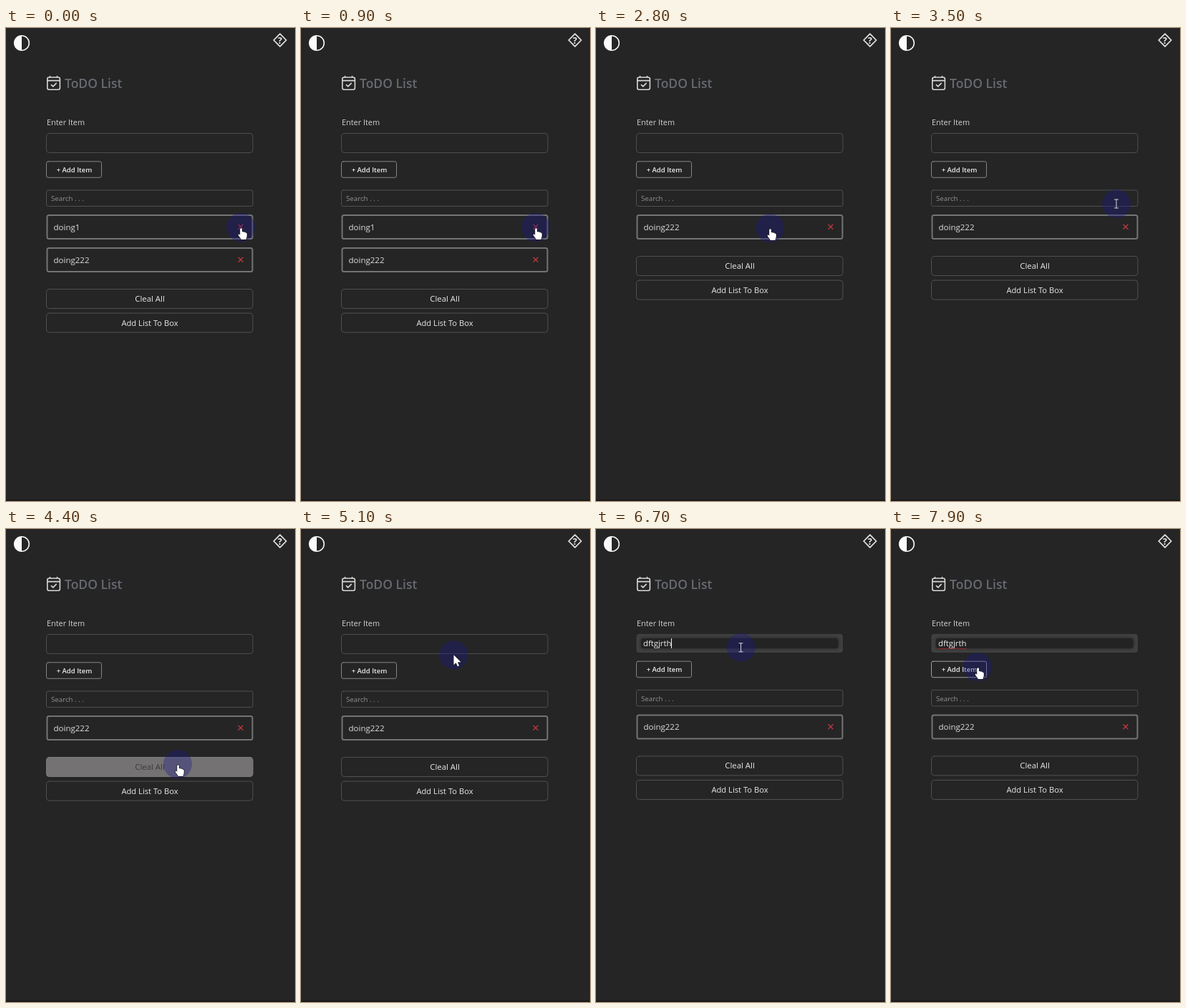
These frames come from a looping animation (404x662 px, 8000 ms). An HTML page with a canvas:

```html
<!DOCTYPE html>
<html lang="en">
<head>
<meta charset="utf-8">
<title>ToDO List</title>
<style>
html, body { margin: 0; width: 100%; height: 100%; overflow: hidden; background: #252526; }
canvas { display: block; width: 404px; height: 662px; }
</style>
</head>
<body>
<canvas id="stage"></canvas>
<script>
const W = 404, H = 662, LOOP = 8000, BG = '#252526';
const canvas = document.getElementById('stage');
const ctx = canvas.getContext('2d');
const dpr = window.devicePixelRatio || 1;
canvas.width = W * dpr;
canvas.height = H * dpr;

// Pointer hot spot: [ms, x, y]
const path = [
  [0, 328, 279], [2350, 328, 279], [2800, 243, 280], [3200, 258, 284],
  [3500, 315, 246], [3750, 337, 258], [4100, 262, 322], [4400, 240, 329],
  [4650, 236, 327], [5000, 214, 196], [5200, 213, 157], [6450, 213, 157],
  [6800, 200, 168], [7600, 200, 168], [7800, 113, 206], [7900, 121, 193], [8000, 121, 193]
];
const clicks = [1750, 5350];
const deleteAt = 2050, focusAt = 5400, popupAt = 5700, popupEnd = 6000, spellAt = 7300;
const typing = [[5700, 'd'], [5800, 'df'], [6000, 'dft'], [6100, 'dftgj'], [6200, 'dftgjr'], [6300, 'dftgjrth']];
const hints = ['dfgngfn', 'dtghmym', 'drfgn', 'dwfbdf', 'dfbqe', 'dfdfdf'];

const clamp = v => Math.max(0, Math.min(1, v));

function pointerAt(t) {
  let i = 0;
  while (i < path.length - 2 && path[i + 1][0] <= t) i++;
  const [t0, x0, y0] = path[i], [t1, x1, y1] = path[i + 1];
  const k = clamp((t - t0) / (t1 - t0)), e = k * k * (3 - 2 * k);
  return { x: x0 + (x1 - x0) * e, y: y0 + (y1 - y0) * e };
}

function text(s, x, y, size, color, weight = 400, align = 'left') {
  ctx.font = `${weight} ${size}px "Open Sans", "Noto Sans", sans-serif`;
  ctx.textAlign = align;
  ctx.textBaseline = 'alphabetic';
  ctx.fillStyle = color;
  ctx.fillText(s, x, y);
}

function box(x, y, w, h, r, stroke, width = 1, fill) {
  ctx.beginPath();
  ctx.roundRect(x, y, w, h, r);
  if (fill) { ctx.fillStyle = fill; ctx.fill(); }
  if (stroke) { ctx.strokeStyle = stroke; ctx.lineWidth = width; ctx.stroke(); }
}

function lines(points, color, width, close) {
  ctx.beginPath();
  points.forEach(([x, y], i) => i ? ctx.lineTo(x, y) : ctx.moveTo(x, y));
  if (close) ctx.closePath();
  ctx.strokeStyle = color;
  ctx.lineWidth = width;
  ctx.lineJoin = ctx.lineCap = 'round';
  ctx.stroke();
}

function themeIcon() {
  ctx.beginPath();
  ctx.arc(22, 21, 10.3, 0, 7);
  ctx.strokeStyle = '#f4f4f4';
  ctx.lineWidth = 1.6;
  ctx.stroke();
  ctx.beginPath();
  ctx.arc(22, 21, 10.5, Math.PI / 2, Math.PI * 1.5);
  ctx.fillStyle = '#fafafa';
  ctx.fill();
}

function helpIcon() {
  lines([[383, 8.2], [391.8, 17], [383, 25.8], [374.2, 17]], '#e6e6e6', 1.7, true);
  text('?', 383, 21.6, 12.5, '#f0f0f0', 700, 'center');
}

function calendarIcon() {
  const c = '#d8d9d5';
  box(57.8, 69, 17.6, 17.2, 2.5, c, 1.6);
  lines([[58, 73.6], [75, 73.6]], c, 1.6);
  lines([[61.5, 67.5], [61.5, 69]], c, 1.5);
  lines([[71.5, 67.5], [71.5, 69]], c, 1.5);
  lines([[63.4, 79.6], [65.8, 81.9], [70.2, 77.4]], c, 1.6);
}

function item(label, y) {
  box(57.5, y + 1, 287, 33, 2.5, '#747475', 2);
  text(label, 66.5, y + 21.5, 11.5, '#dededf');
  const cy = y + 17.3, r = 3;
  lines([[328 - r, cy - r], [328 + r, cy + r]], '#c4383d', 1.3);
  lines([[328 + r, cy - r], [328 - r, cy + r]], '#c4383d', 1.3);
}

function button(label, y, size, hover) {
  box(56.5, y + .5, 288.5, 27, 4, '#505051');
  if (hover > 0) {
    ctx.globalAlpha = hover;
    box(56.5, y + .5, 288.5, 27, 4, '#7d7b7b', 1, '#747272');
    ctx.globalAlpha = 1;
  }
  text(label, 201, y + 18, size, hover > .5 ? '#3c3b3b' : '#e8e8e8', 400, 'center');
}

function field(t, focused) {
  if (!focused) return box(56.5, 147.5, 288.5, 27, 4, '#4e4e4f');
  box(56.5, 147, 288.5, 26, 4, null, 0, '#414142');
  ctx.save();
  ctx.beginPath();
  ctx.roundRect(56.5, 147, 288.5, 26, 4);
  ctx.clip();
  ctx.shadowColor = '#222223';
  ctx.shadowBlur = 5 * dpr;
  box(63, 153, 275.5, 14, 3, null, 0, '#232324');
  ctx.restore();

  let value = '', last = focusAt;
  for (const [at, s] of typing) if (t >= at) { value = s; last = at; }
  text(value, 66, 164.3, 11.3, '#f0f0f0');
  const end = 66 + ctx.measureText(value).width;
  if (t >= spellAt) {
    ctx.beginPath();
    for (let x = 66; x <= end; x += .5) ctx.lineTo(x, 167.3 + .6 * Math.sin(x * 2.1));
    ctx.strokeStyle = '#b02a2a';
    ctx.lineWidth = 1;
    ctx.stroke();
  }
  if (Math.floor((t - last) / 530) % 2 === 0) {
    ctx.fillStyle = '#f4f4f4';
    ctx.fillRect(Math.round(end), 153, 1, 14);
  }
}

function popup() {
  ctx.save();
  ctx.shadowColor = 'rgba(0,0,0,.3)';
  ctx.shadowBlur = 4 * dpr;
  box(129.5, 180, 114.5, 164.5, 4, null, 0, '#1d1d1e');
  ctx.restore();
  hints.forEach((s, i) => text(s, 138, 199.5 + i * 26.4, 9.2, '#dedede', 600));
}

function hand(x, y) {
  ctx.save();
  ctx.translate(x, y);
  ctx.beginPath();
  ctx.moveTo(-.8, 9);
  ctx.lineTo(-.8, 2.2);
  ctx.quadraticCurveTo(.6, .2, 2, 2.2);
  ctx.lineTo(2, 6.2);
  ctx.quadraticCurveTo(3.6, 5.4, 4.6, 6.8);
  ctx.quadraticCurveTo(6, 6.2, 6.9, 7.5);
  ctx.quadraticCurveTo(8.6, 7.2, 8.8, 9);
  ctx.lineTo(8.8, 12);
  ctx.quadraticCurveTo(8.5, 14.5, 7.3, 17);
  ctx.lineTo(.8, 17);
  ctx.quadraticCurveTo(-.6, 14, -3, 11.4);
  ctx.quadraticCurveTo(-4, 9.6, -2.4, 9.4);
  ctx.quadraticCurveTo(-1.4, 9.6, -.8, 11);
  ctx.closePath();
  ctx.strokeStyle = '#18181c';
  ctx.lineWidth = 1.4;
  ctx.stroke();
  ctx.fillStyle = '#fff';
  ctx.fill();
  ctx.restore();
}

function beam(x, y) {
  lines([[x, y - 5.5], [x, y + 5.5]], '#d8d8dc', 1);
  for (const dy of [-6, 6]) lines([[x - 2.5, y + dy], [x + 2.5, y + dy]], '#d8d8dc', 1);
}

function arrow(x, y) {
  const p = [[0, 0], [0, 14], [3.2, 11], [5.4, 16], [7.6, 15], [5.4, 10.2], [10, 10]].map(([a, b]) => [x + a, y + b]);
  lines(p, '#18181c', 1.2, true);
  ctx.fillStyle = '#fff';
  ctx.fill();
}

function pointer(t, p, rows) {
  ctx.beginPath();
  ctx.arc(p.x, p.y, 20, 0, 7);
  ctx.fillStyle = 'rgba(25,25,139,.34)';
  ctx.fill();
  for (const at of clicks) {
    const k = (t - at) / 300;
    if (k < 0 || k > 1) continue;
    ctx.beginPath();
    ctx.arc(p.x, p.y, 7 + 13 * k, 0, 7);
    ctx.strokeStyle = `rgba(150,16,90,${.7 * (1 - k)})`;
    ctx.lineWidth = 4;
    ctx.stroke();
  }
  const within = (y, h, right = 345) => p.x > 56 && p.x < right && p.y >= y && p.y <= y + h;
  if (within(147, 28) || within(226, 24)) beam(p.x, p.y);
  else if (within(186, 24, 134) || rows.some(([y, h]) => within(y, h))) hand(p.x, p.y);
  else arrow(p.x, p.y);
}

function draw(t) {
  ctx.setTransform(dpr, 0, 0, dpr, 0, 0);
  ctx.fillStyle = BG;
  ctx.fillRect(0, 0, W, H);
  ctx.fillStyle = '#1d1719';
  ctx.fillRect(0, 660, W, 2);

  const focused = t >= focusAt;
  const lift = focused ? -1.6 : 0;
  const removed = t >= deleteAt;
  const items = removed ? ['doing222'] : ['doing1', 'doing222'];
  const clearY = (removed ? 319 : 365) + lift;
  const p = pointerAt(t);

  themeIcon();
  helpIcon();
  calendarIcon();
  text('ToDO List', 82, 83.5, 17.5, '#676a70', 600);
  text('Enter Item', 57, 136.3, 10.9, '#d2d2d2');
  field(t, focused);
  box(56.5, 186.8 + lift, 77, 22.5, 2.5, t > 7750 ? '#a0a0a0' : '#858586');
  text('+ Add Item', 95.5, 201.8 + lift, 9.5, '#ececec', 600, 'center');
  box(56.5, 227 + lift, 288.5, 22.5, 2.5, '#505051');
  text('Search . . .', 63, 242.3 + lift, 9.7, '#929293');
  items.forEach((s, i) => item(s, 261 + lift + i * 46));
  button('Cleal All', clearY, 11.4, clamp((t - 4050) / 150) * clamp((4850 - t) / 150));
  button('Add List To Box', clearY + 33.6, 11.2, 0);
  if (t >= popupAt && t < popupEnd) popup();

  const rows = items.map((s, i) => [261 + lift + i * 46, 35]);
  rows.push([clearY, 28], [clearY + 33.6, 28]);
  pointer(t, p, rows);
}

const start = performance.now();
function frame() {
  draw((performance.now() - start) % LOOP);
  requestAnimationFrame(frame);
}
frame();
</script>
</body>
</html>
```
